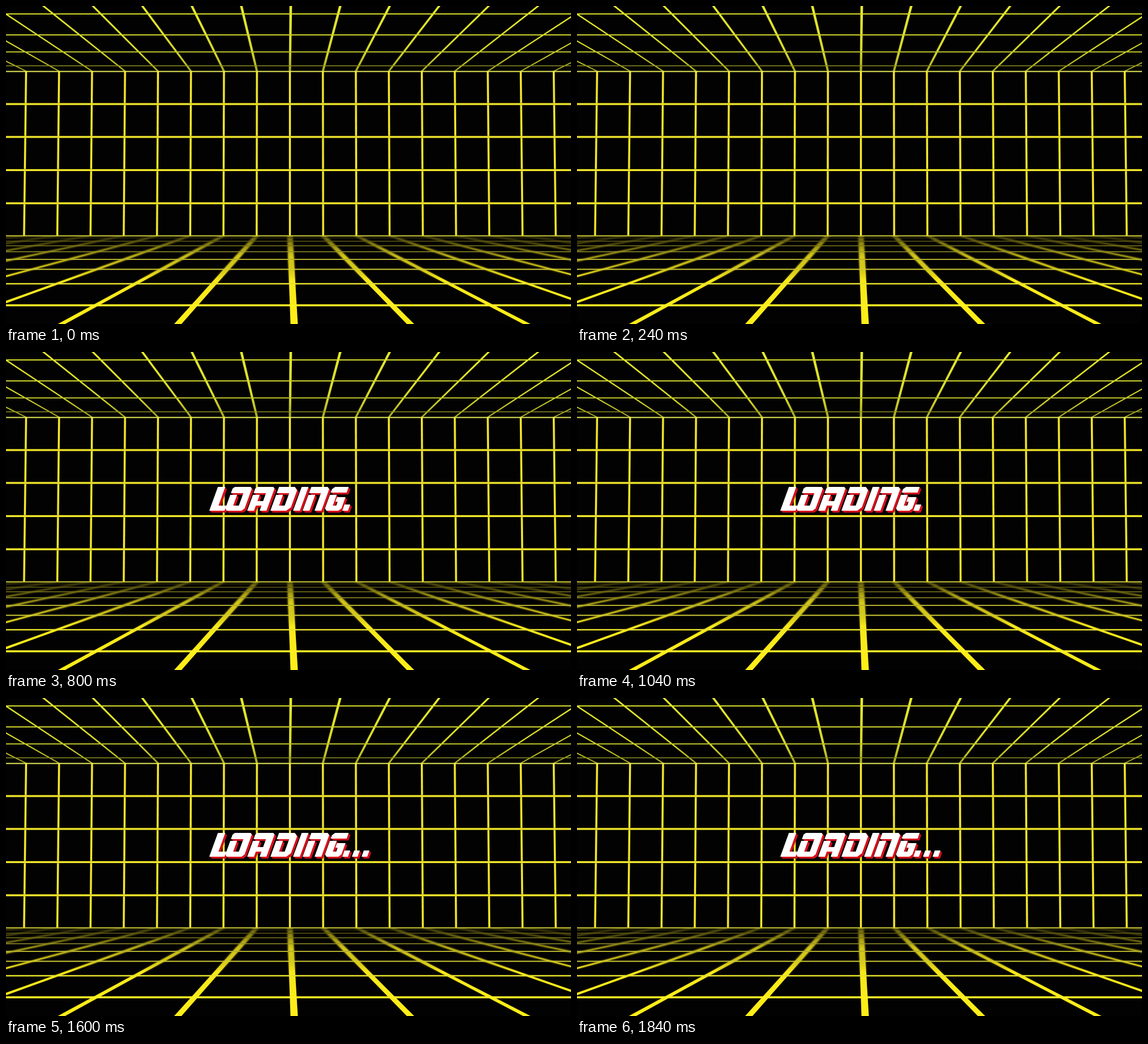
These frames come from a looping animation (998 px wide and 561 px high, 2000 ms). An HTML page:

```html
<!DOCTYPE html>
<html lang="en">
<head>
<meta charset="utf-8">
<title>Loading</title>
<style>
  html, body { margin: 0; width: 100%; height: 100%; overflow: hidden; background: #030202; }
  svg { display: block; width: 100vw; height: 100vh; }
</style>
</head>
<body>
<svg viewBox="0 0 998 561" preserveAspectRatio="none" role="img" aria-label="Loading...">
  <defs>
    <linearGradient id="ceilingFill" gradientUnits="userSpaceOnUse" x1="0" y1="0" x2="0" y2="115">
      <stop offset="0" stop-color="#e4ea2c"/>
      <stop offset=".7" stop-color="#d4d82a"/>
      <stop offset="1" stop-color="#a8aa20"/>
    </linearGradient>
    <linearGradient id="floorSharp" gradientUnits="userSpaceOnUse" x1="0" y1="405" x2="0" y2="561">
      <stop offset=".05" stop-color="#d8cc18" stop-opacity="0"/>
      <stop offset=".5" stop-color="#f8e81a"/>
      <stop offset="1" stop-color="#ffee18"/>
    </linearGradient>
    <linearGradient id="floorSoft" gradientUnits="userSpaceOnUse" x1="0" y1="405" x2="0" y2="561">
      <stop offset="0" stop-color="#8a8010" stop-opacity=".75"/>
      <stop offset=".25" stop-color="#d0c416"/>
      <stop offset=".65" stop-color="#ffee18" stop-opacity="0"/>
    </linearGradient>
    <filter id="soft" filterUnits="userSpaceOnUse" x="-20" y="395" width="1038" height="180">
      <feGaussianBlur stdDeviation="1.6"/>
    </filter>
    <clipPath id="floorArea"><rect y="405" width="998" height="156"/></clipPath>
    <g id="word"></g>
    <path id="dot" d="M0-11h10v11h-10z" transform="skewX(-20)"/>
  </defs>
  <rect width="998" height="561" fill="#030202"/>
  <g id="ceiling" fill="url(#ceilingFill)"></g>
  <g clip-path="url(#floorArea)">
    <g id="floorBlur" fill="url(#floorSoft)" filter="url(#soft)"></g>
    <g id="floor" fill="url(#floorSharp)"></g>
  </g>
  <g id="wall"></g>
  <g id="rows"></g>
  <g id="label"></g>
</svg>
<script>
const LOOP = 2000, STEP = 400;
const $ = id => document.getElementById(id);

function add(parent, tag, attrs) {
  const el = document.createElementNS('http://www.w3.org/2000/svg', tag);
  for (const key in attrs) el.setAttribute(key, attrs[key]);
  return parent.appendChild(el);
}

// Strip between two heights, with its own width at each end
function strip(parent, x1, y1, w1, x2, y2, w2) {
  const points = [x1 - w1 / 2, y1, x1 + w1 / 2, y1, x2 + w2 / 2, y2, x2 - w2 / 2, y2];
  add(parent, 'polygon', { points: points.join(' ') });
}

function row(y, width, color) {
  add($('rows'), 'path', { d: `M0 ${y}H998`, stroke: color, 'stroke-width': width });
}

function wallLine(d) {
  add($('wall'), 'path', { d, stroke: '#6a6408', 'stroke-width': 4.6, opacity: .6 });
  add($('wall'), 'path', { d, stroke: '#f6ec2e', 'stroke-width': 3.1 });
}

for (let k = -9; k <= 9; k++) {
  const top = 501.5 + 58.25 * k, bottom = 501.5 + 58.7 * k, front = 509 + 205.5 * k;
  strip($('ceiling'), 503 + 87.4 * k, 0, 4.6, top, 115, 4);
  strip($('floorBlur'), bottom, 405, 10, front, 561, 13);
  strip($('floor'), bottom, 405, 9, front, 561, 13);
  wallLine(`M${top} 116L${bottom} 405`);
}
[173, 231, 289.5, 348].forEach(y => wallLine(`M0 ${y}H998`));

[
  [14, 2.2, '#d6dc2c'], [51, 2, '#ccd22c'], [81, 1.8, '#b8be2a'], [105.5, 1.5, '#8c9022'],
  [115.5, 2, '#e6ea58'], [405.5, 1.8, '#cfcc38'],
  [409, 1.2, '#45420e'], [415, 1.3, '#5c5814'], [423, 1.5, '#7c781c'], [433.5, 1.6, '#98942a'],
  [447, 1.8, '#b4b02e'], [464.5, 2, '#d0cc34'], [490, 2.5, '#e8e22c'], [528, 3.4, '#fcf024']
].forEach(line => row(...line));

// Upright letter shapes on a baseline at 0; the group is slanted
const letters = [
  [359, 'M0-42h13v33h14v9h-27z'],
  [386, 'M3-42H31l3 3V-4l-4 4H4l-4-4V-28H12V-9H22V-31H0V-39z'],
  [426, 'M3-42H31l3 3V0H22V-9H12V0H0V-28H12V-17H22V-31H0V-39z'],
  [467, 'M0-42H28l6 6V-6l-6 6H0V-28H12V-9H22V-31H0z'],
  [507, 'M0-42h12v42h-12z'],
  [524, 'M0-42H29l4 4V0H21V-31H0zM0-28H12V0H0z'],
  [562, 'M4-42H28V-32H0V-38zM0-28H12V-9H18V-16H14V-24H29V-4l-4 4H4l-4-4z']
];
const slant = add($('word'), 'g', { transform: 'skewX(-20)' });
letters.forEach(([x, d]) => add(slant, 'path', { d, transform: `translate(${x})` }));

function reveal(href, x, start) {
  const part = add($('label'), 'g', { transform: `translate(${x} 280)` });
  [[3.2, '#d4101c'], [1.6, '#d4101c'], [0, '#fff']].forEach(([shift, fill]) =>
    add(part, 'use', { href, fill, x: shift, y: shift }));
  const offset = start / LOOP;
  part.animate(
    [{ opacity: 0 }, { opacity: 0, offset }, { opacity: 1, offset }, { opacity: 1 }],
    { duration: LOOP, iterations: Infinity });
}

reveal('#word', 0, STEP);
for (let i = 0; i < 3; i++) reveal('#dot', 594 + 17 * i, STEP * (i + 2));
</script>
</body>
</html>
```
